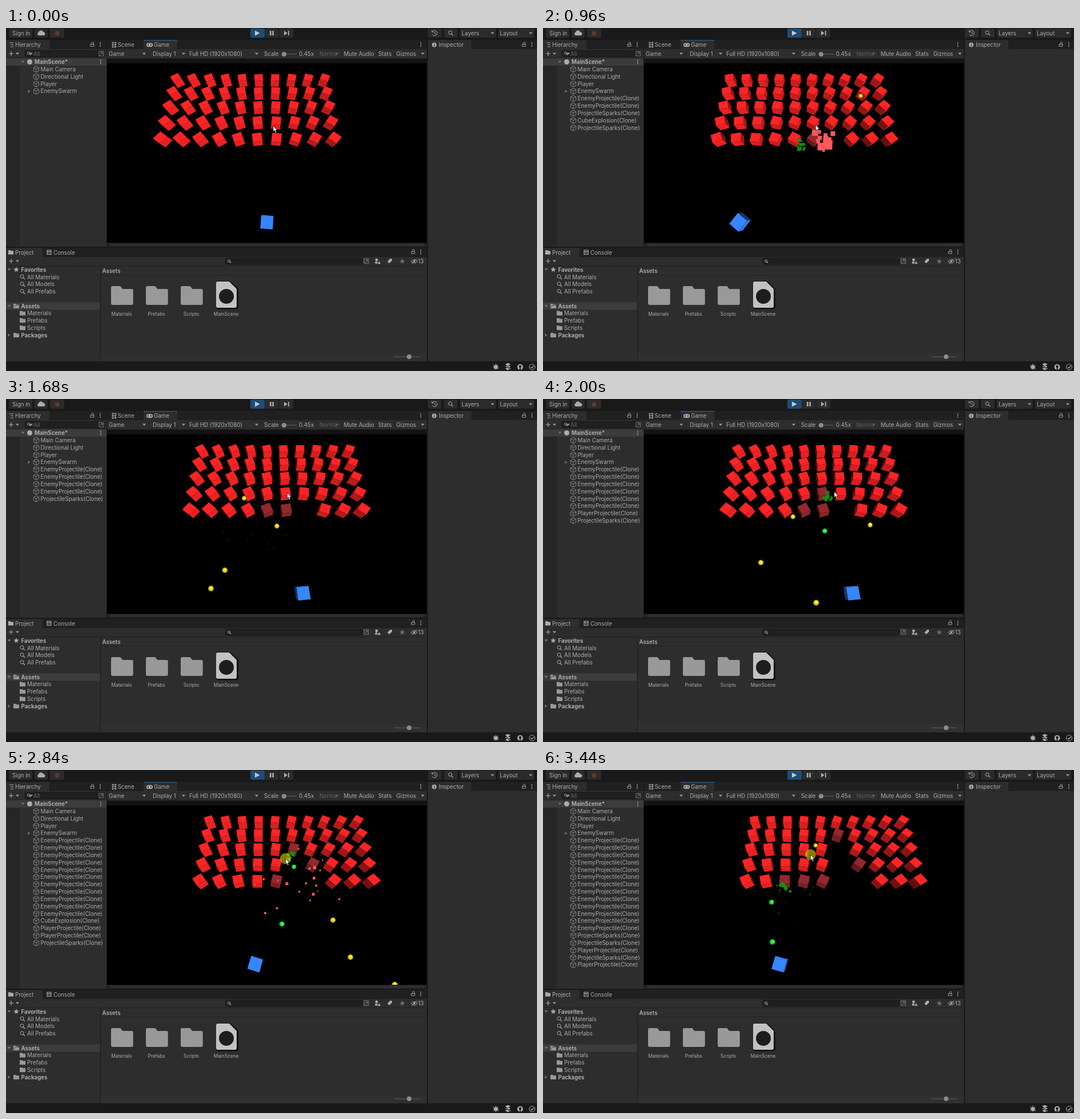
Animation, 930 px wide and 602 px high, one loop 3.48 s. Source, as an HTML page with a canvas:

```html
<!DOCTYPE html>
<html lang="en">
<head>
<meta charset="utf-8">
<title>Cube swarm in the editor</title>
<style>
html, body { margin: 0; width: 100%; height: 100%; overflow: hidden; background: #191919; }
svg, canvas { position: absolute; left: 0; top: 0; display: block; }
canvas { left: 177px; top: 62px; }
text { font-family: Inter, Roboto, sans-serif; white-space: pre; }
</style>
</head>
<body>
<svg id="ui" width="930" height="602" viewBox="0 0 930 602"></svg>
<canvas id="game" width="560" height="315"></canvas>
<script>
// ---------- editor window ----------
const INK = '#acacac', PANEL = '#2d2d2d', BAR = '#202020', EDGE = '#191919';
const rect = (x, y, w, h, fill, more = '') => `<rect x="${x}" y="${y}" width="${w}" height="${h}" fill="${fill}" ${more}/>`;
const text = (x, y, s, size = 9.8, more = '') => `<text x="${x}" y="${y + 3.5}" font-size="${size}" fill="${INK}" ${more}>${s}</text>`;
const bold = (x, y, s) => text(x, y, s, 9.7, 'font-weight="700"');
const fill = (d, c = INK) => `<path d="${d}" fill="${c}"/>`;
const line = (d, c = INK, w = 1) => `<path d="${d}" fill="none" stroke="${c}" stroke-width="${w}"/>`;
const disc = (x, y, r, c = INK) => `<circle cx="${x}" cy="${y}" r="${r}" fill="${c}"/>`;
const ring = (x, y, r) => `<circle cx="${x}" cy="${y}" r="${r}" fill="none" stroke="${INK}"/>`;
const down = (x, y) => fill(`M${x - 3.2} ${y - 1.5}h6.4l-3.2 3.5z`, '#999');
const right = (x, y) => fill(`M${x - 2} ${y - 3}v6l4 -3z`, '#707070');
const open = (x, y) => fill(`M${x - 3} ${y - 2}h6l-3 4z`, '#707070');
const dots = (x, y) => [-3, 0, 3].map(d => disc(x, y + d, 0.9)).join('');
const lock = (x, y) => line(`M${x - 3} ${y - .5}h6v3.500h-6zM${x - 1} ${y - 1}v-1.500a1.700 1.700 0 0 1 3.400 0v2`, INK, .9);
const lens = (x, y, r = 3) => ring(x, y, r) + line(`M${x + r * .7} ${y + r * .7}l${r} ${r}`, INK, 1.3);
const plus = (x, y) => line(`M${x - 4} ${y}h8M${x} ${y - 4}v8`, INK, 1.2) + down(x + 11, y);
const folder = (x, y, w, h, c = '#999') => {
  const r = w / 16;
  return fill(`M${x} ${y + r}q0 ${-r} ${r} ${-r}h${w * .36}l${w * .1} ${h * .15}h${w * .42}q${r} 0 ${r} ${r}V${y + h - r}q0 ${r} ${-r} ${r}H${x + r}q${-r} 0 ${-r} ${-r}z`, c);
};
const cubeIcon = (x, y) => line(`M${x} ${y - 5.3}l4.7 2.4v5.7l-4.7 2.5l-4.7 -2.5v-5.7zM${x - 4.7} ${y - 2.9}l4.7 2.5l4.7 -2.5M${x} ${y - .4}v5.5`, '#8f8f8f', .9);
const popup = (x, y) => line(`M${x - 4} ${y - 4}h8v8h-8zM${x - 2} ${y + 2}l4 -4h-3m3 0v3`, '#888', .9);
const star = (x, y, r, c = INK) => fill('M' + [...Array(10).keys()].map(i => {
  const a = i * Math.PI / 5, q = i % 2 ? r * .45 : r;
  return `${(x + q * Math.sin(a)).toFixed(1)} ${(y - q * Math.cos(a)).toFixed(1)}`;
}).join('L') + 'z', c);
const button = (x, w, c = '#2b2b2b') => rect(x, 1, w, 16, c, 'rx="2"');
const ROW = 12.83, rowY = i => 72.5 + i * ROW;
const item = (i, s) => cubeIcon(53, rowY(i)) + text(60.5, rowY(i), s);

const toolbar = () => button(5, 41) + text(11, 9, 'Sign in') + button(50, 23) + button(77, 25) +
  fill('M57 13a3 3 0 0 1 0 -5.5a4.3 4.3 0 0 1 8 -.8a3.3 3.3 0 0 1 1.5 6.3z') + disc(89.5, 9.5, 4, '#5e3a2c') +
  button(428, 25, '#1f4c75') + button(453.5, 24) + button(478.5, 25) +
  fill('M436 4.5v9l8.5 -4.5z', '#c8c8c8') + rect(462, 5, 2.6, 8, INK) + rect(466.4, 5, 2.6, 8, INK) +
  fill('M487 5v8l6 -4z') + rect(494, 5, 1.8, 8, INK) +
  button(739, 24) + line('M747 6.2a4.5 4.5 0 1 1 -.3 5M746 4v3h3M751 6.5v3l2 1') +
  button(767, 24) + lens(778, 8) + button(795, 63) + text(798, 9, 'Layers') + down(852, 9) +
  button(862, 63) + text(865, 9, 'Layout') + down(919, 9);

const hierarchy = () => rect(0, 21, 176, 363, PANEL) + rect(0, 21, 176, 16, BAR) + rect(0, 21, 76, 17, PANEL) +
  rect(0, 53, 24, 331, '#262626') + rect(0, 52, 176, 1, '#222') + rect(0, 53, 176, 13, '#3c3c3c') +
  line('M6 26h7M8 29.5h5M8 33h5') + text(16, 29, 'Hierarchy') + lock(151, 29) + dots(165, 29) +
  plus(9, 45) + rect(33, 39.5, 140, 11, BAR, 'rx="3" stroke="#181818"') + lens(39.5, 44, 2) + down(44, 45) +
  text(48, 45, 'All', 9.7, 'opacity=".5"') + popup(167, 45) +
  open(29.5, 59.5) + disc(41.5, 59.5, 4.5) + bold(50, 59.5, 'MainScene*') + dots(166, 59.5) +
  ['Main Camera', 'Directional Light', 'Player', 'EnemySwarm'].map((s, i) => item(i, s)).join('') + right(40.5, rowY(3));

const gamePanel = () => rect(177, 21, 560, 363, PANEL) + rect(177, 21, 560, 16, BAR) +
  rect(241, 21, 59, 17, PANEL) + rect(241, 21, 59, 1.2, '#2c5d8f') +
  line('M185 26h9M185 29.5h9M185 33h9M187 24v11M191.5 24v11') + text(195.5, 29, 'Scene') +
  rect(246, 26.5, 11, 6.5, INK, 'rx="3"') + disc(249, 29.7, 1.2, PANEL) + disc(254, 29.7, 1.2, PANEL) + text(259, 29, 'Game') + dots(726.5, 29) +
  rect(177, 53, 560, 9, '#131313') + rect(177, 53, 560, 1, '#222') + rect(177, 62, 560, 315, '#000') +
  rect(177, 377, 560, 7, '#222') + rect(182, 378.5, 551, 4, '#303030', 'rx="2"') +
  [249.5, 317, 445, 587, 648.5, 680].map(x => rect(x, 39, 1, 13, '#222')).join('') +
  text(180, 45, 'Game') + down(242, 45) + text(257, 45, 'Display 1') + down(311, 45) +
  text(321, 45, 'Full HD (1920x1080)') + down(439, 45) + text(452, 45.5, 'Scale') +
  rect(482, 45, 27, 1.5, '#555') + disc(487, 46, 4, '#8c8c8c') + text(513, 45.5, '0.45x') +
  text(549, 45, 'Norma', 9.7, 'opacity=".4"') + `<g opacity=".4">${down(580, 45)}</g>` +
  text(591.5, 45, 'Mute Audio') + text(652, 45, 'Stats') + text(683.5, 45, 'Gizmos') + down(730, 45);

const inspector = () => rect(739, 21, 191, 564, PANEL) + rect(739, 21, 191, 16, BAR) + rect(739, 21, 76, 17, PANEL) +
  disc(750, 29.5, 4) + rect(749.4, 28.7, 1.3, 3.5, PANEL) + rect(749.4, 26.7, 1.3, 1.2, PANEL) +
  text(758, 29, 'Inspector') + lock(907, 29) + dots(921, 29);

const project = () => rect(0, 386, 737, 199, PANEL) + rect(0, 386, 737, 16, BAR) + rect(0, 386, 64, 17, PANEL) +
  folder(4, 390, 9, 7.5, INK) + text(16, 394, 'Project') +
  line('M72 390h7v7.5h-7zM72 392.3h7M73.5 395h4', INK, 1.2) + text(83, 394, 'Console') + lock(713, 393) + dots(726.5, 393) +
  plus(9, 409) + rect(384.5, 404, 240, 11, BAR, 'rx="3" stroke="#181818"') + lens(390.5, 409, 2) + popup(631, 409) +
  disc(649, 407, 2.4) + rect(646.5, 410, 4, 3.5, INK) + fill('M651 414l2.5 -5l2.5 5z') +
  fill('M668 410l4.5 -5h3.5v3.5l-5 4.5z') + star(694, 409.5, 5, '#6c6c6c') +
  line('M709.5 409.5q5.5 -6 11 0q-5.5 6 -11 0M710.5 414l9 -9') + disc(715, 409.5, 1.8) + text(721.5, 409.5, '13') +
  rect(0, 417, 737, 1, '#222') + rect(165, 418, 1, 167, '#1e1e1e') + rect(166, 433, 571, 1, '#252525') + text(168.5, 426, 'Assets', 9.7, 'font-weight="600"') +
  rect(0, 481.5, 164.5, 13, '#3c3c3c') +
  open(5.5, 424) + star(18, 424, 5) + bold(26.5, 424, 'Favorites') +
  ['All Materials', 'All Models', 'All Prefabs'].map((s, i) => lens(28, 436 + i * ROW, 3) + text(37, 437 + i * ROW, s)).join('') +
  open(5.5, 488) + folder(13, 484, 10, 8) + line('M14 490.5l2 -4h8', '#3c3c3c', .8) + bold(26.5, 488, 'Assets') +
  ['Materials', 'Prefabs', 'Scripts'].map((s, i) => folder(24, 496.5 + i * ROW, 10, 8) + text(37, 500.5 + i * ROW, s) +
    folder(184 + i * 61, 453, 38.5, 33) + text(202.5 + i * 61, 501, s, 8.3, 'text-anchor="middle"')).join('') +
  right(5.5, 539) + folder(13, 535, 10, 8) + bold(26.5, 539, 'Packages') +
  fill('M371 444.5h22l14 13v32q0 4 -4 4h-31q-4 0 -4 -4v-41q0 -4 3 -4z', '#111') +
  fill('M371 445h20l13 13v30q0 3 -3 3h-30q-3 0 -3 -3v-40q0 -3 3 -3z', '#c2c2c2') + disc(386, 471, 13, '#1d1d1d') +
  text(385.5, 501, 'MainScene', 8.3, 'text-anchor="middle"') +
  rect(166, 571, 571, 14, '#303030') + rect(680, 576.5, 45, 1.3, '#555') + disc(706, 577, 4, '#8c8c8c');

const status = () => disc(858, 595, 3.5) + line('M853 591l10 8M853 595h10M854 599l8 -8M858 589v11') +
  [590, 594, 598].map(y => fill(`M874 ${y}l5 -2l5 2l-5 2.5z`)).join('') + line('M874 590l10 10', EDGE, 1.4) + line('M875 590l9 9') +
  disc(900.5, 595, 5) + disc(900.5, 594, 2.2, EDGE) + rect(899.5, 596, 2, 4, EDGE) +
  ring(921.5, 595, 5) + line('M919 595l2 2l3.5 -4', INK, 1.2);

document.getElementById('ui').innerHTML = rect(0, 0, 930, 602, EDGE) + toolbar() + hierarchy() + gamePanel() +
  inspector() + project() + status() + '<g id="clones"></g>';

// ---------- 3D view: camera 15 units up, pitched 70 degrees, 60 degree lens ----------
const g = document.getElementById('game').getContext('2d');
const LOOP = 3480, CX = 457, CY = 219.5, F = 272.8, H = 15;
const SIN = Math.sin(70 * Math.PI / 180), COS = Math.cos(70 * Math.PI / 180);
const LIGHT = [.321, .766, -.557];

function toScreen(x, y, z) {
  const s = F / ((H - y) * SIN + z * COS);
  return [CX + x * s, CY - ((y - H) * COS + z * SIN) * s, s];
}
function toGround(sx, sy) {
  const u = (CY - sy) / F, z = H * (COS + u * SIN) / (SIN - u * COS);
  return [(sx - CX) / F * (H * SIN + z * COS), z];
}
function track(keys, t) {
  let i = 1;
  while (i < keys.length - 1 && keys[i][0] < t) i++;
  const a = keys[i - 1], b = keys[i], k = Math.min(1, Math.max(0, (t - a[0]) / (b[0] - a[0])));
  return a.slice(1).map((v, j) => v + (b[j + 1] - v) * k);
}
const noise = n => { const v = Math.sin(n * 127.1 + 11.7) * 43758.5453; return v - Math.floor(v); };

// A cube on the ground, turned to face (tx, tz)
function cube(x, z, tx, tz, color, size = 1) {
  const len = Math.hypot(tx - x, tz - z) || 1, fx = (tx - x) / len, fz = (tz - z) / len, h = size / 2;
  const axes = [[fz, 0, -fx], [0, 1, 0], [fx, 0, fz]];
  for (let a = 0; a < 3; a++) for (const side of [-1, 1]) {
    const n = axes[a].map(v => v * side), u = axes[(a + 1) % 3], v = axes[(a + 2) % 3];
    const c = [x + n[0] * h, n[1] * h, z + n[2] * h];
    if (n[0] * c[0] + n[1] * (c[1] - H) + n[2] * c[2] >= 0) continue;
    const lit = Math.max(0, n[0] * LIGHT[0] + n[1] * LIGHT[1] + n[2] * LIGHT[2]);
    const k = Math.min(1, (.126 + 1.14 * lit) ** .4545);
    g.fillStyle = `rgb(${color.map(q => Math.round(q * k))})`;
    g.beginPath();
    for (const [p, q] of [[-h, -h], [h, -h], [h, h], [-h, h]]) {
      const s = toScreen(...c.map((w, i) => w + u[i] * p + v[i] * q));
      g.lineTo(s[0], s[1]);
    }
    g.fill();
  }
}
function ball(x, z, light, mid, dark) {
  const [sx, sy, s] = toScreen(x, 0, z), r = s * .26;
  const shade = g.createRadialGradient(sx + r * .2, sy - r * .25, 0, sx, sy, r);
  [light, mid, dark].forEach((c, i) => shade.addColorStop([0, .55, 1][i], c));
  g.fillStyle = shade;
  g.beginPath();
  g.arc(sx, sy, r, 0, 7);
  g.fill();
}
function burst(age, x, z, seed, o) {
  if (age < 0 || age >= o.life) return;
  const [sx, sy] = toScreen(x, 0, z), sec = age / 1000;
  g.fillStyle = o.color;
  for (let i = 0; i < o.count; i++) {
    const n = seed * 50 + i * 3, a = noise(n) * 6.283, d = o.speed * (.1 + .9 * noise(n + 1)) * sec;
    const w = Math.max(1, o.size * (.35 + .65 * noise(n + 2)) * (1 - age / o.life));
    g.fillRect(sx + Math.cos(a) * d - w / 2, sy + Math.sin(a) * d + o.fall * sec * sec - w / 2, w, w);
  }
}
const DEBRIS = { life: 480, count: 20, speed: 270, size: 16, fall: 360, color: '#ff5a5a' };
const SPARKS = { life: 330, count: 12, speed: 230, size: 7, fall: 220, color: '#009a08' };

// ---------- the battle ----------
// Turning points: time, then position (ground x for the player, pixels for the mouse)
const PLAYER = [[120, 0], [480, -6], [960, -5.6], [1130, -10], [1400, -4.1], [1730, 4.4], [1865, 1], [2000, 4.2],
  [2240, 10], [2400, 10], [2840, -1], [3210, -10], [3440, -2.1]];
const MOUSE = [[0, 468, 172], [400, 515, 172], [600, 515, 172], [700, 478, 171], [1400, 476, 168], [1740, 496, 164],
  [2000, 510, 162.5], [2360, 514.5, 162], [2840, 489.5, 155.5], [3440, 468.5, 148.5]];
const CLICKS = [400, 630, 700, 1146, 1730, 1868, 2120, 2249, 2500, 2615, 2760, 3000, 3150, 3275, 3395];
// Enemy fire: time, row, column
const VOLLEYS = [[940, 1, 8], [955, 4, 9], [1375, 0, 4], [1600, 4, 5], [1870, 3, 3], [1907, 4, 8], [2120, 3, 8],
  [2160, 3, 8], [2350, 4, 7], [2500, 4, 7], [2560, 3, 7], [2970, 4, 2], [3370, 1, 4]];

const playerX = t => track(PLAYER, t)[0];
const aimAt = t => toGround(...track(MOUSE, t));
const enemyX = (col, t) => -11 + 2 * col + Math.floor((t + 500) / 720);
const enemyZ = row => 15 - 2 * row;

function shoot(t, x, z, tx, tz, speed) {
  const k = speed / 1000 / Math.hypot(tx - x, tz - z);
  return { t, end: LOOP, at: now => [x + (tx - x) * k * (now - t), z + (tz - z) * k * (now - t)] };
}
const shots = CLICKS.map(t => shoot(t, playerX(t), -1, ...aimAt(t), 44));
const enemyShots = VOLLEYS.map(([t, row, col]) => shoot(t, enemyX(col, t), enemyZ(row), playerX(t), -1, 22));
const swarm = Array.from({ length: 50 }, (_, i) => ({ col: i % 10, z: enemyZ(Math.floor(i / 10)), hits: [] }));
const bursts = [];

// The first hit darkens a cube, the second destroys it
for (let t = 0; t < LOOP; t += 4) for (const s of shots) {
  if (t < s.t || t >= s.end) continue;
  const [x, z] = s.at(t);
  const e = swarm.find(e => e.hits.length < 2 && Math.hypot(enemyX(e.col, t) - x, e.z - z) < .75);
  if (!e) continue;
  e.hits.push(t);
  s.end = t;
  bursts.push(e.hits.length > 1 ? { t, x: enemyX(e.col, t), z: e.z, kind: DEBRIS } : { t, x, z, kind: SPARKS });
}

const clones = document.getElementById('clones');
let shown = '';
function showClones(t) {
  const alive = (list, name) => list.filter(o => t >= o.t && t < o.end).map(o => ({ t: o.t, name }));
  const rest = alive(shots, 'PlayerProjectile');
  for (const b of bursts) if (t >= b.t && t < b.t + 480) {
    rest.push({ t: b.t, name: b.kind === DEBRIS ? 'CubeExplosion' : 'ProjectileSparks' });
  }
  rest.sort((a, b) => a.t - b.t);
  const html = [...alive(enemyShots, 'EnemyProjectile'), ...rest].map((o, i) => item(4 + i, o.name + '(Clone)')).join('');
  if (html !== shown) clones.innerHTML = shown = html;
}

function cursor(x, y) {
  g.fillStyle = '#fff';
  g.strokeStyle = '#000';
  g.lineWidth = .7;
  const arrow = new Path2D(`M${x} ${y}v10l2.3 -2l1.7 4l1.8 -.8l-1.7 -3.8l3.1 -.2z`);
  g.fill(arrow);
  g.stroke(arrow);
}

function draw(t) {
  g.setTransform(1, 0, 0, 1, -177, -62);
  g.fillStyle = '#000';
  g.fillRect(177, 62, 560, 315);
  const px = playerX(t), [mx, my] = track(MOUSE, t), items = [];
  for (const { col, z, hits } of swarm) {
    if (t >= hits[1]) continue;
    const color = t >= hits[0] ? [148, 40, 44] : [255, 36, 37];
    items.push([z, () => cube(enemyX(col, t), z, px, -1, color)]);
  }
  items.push([-1, () => cube(px, -1, ...aimAt(t), [54, 134, 255], 1.05)]);
  const addBalls = (list, ...colors) => list.forEach(s => {
    const [x, z] = s.at(t);
    if (t >= s.t && t < s.end && z > -3) items.push([z + .25, () => ball(x, z, ...colors)]);
  });
  addBalls(enemyShots, '#fffb50', '#f0dc1c', '#7d6f00');
  addBalls(shots, '#50ff70', '#22ee44', '#088a20');
  items.sort((a, b) => b[0] - a[0]).forEach(i => i[1]());
  bursts.forEach((b, i) => burst(t - b.t, b.x, b.z, i + 1, b.kind));

  if (CLICKS.some(c => t >= c && t - c < 100)) {
    g.fillStyle = 'rgba(225,215,0,.58)';
    g.beginPath();
    g.arc(mx, my, 9.5, 0, 7);
    g.fill();
  }
  cursor(mx, my);
}

function frame() {
  const t = performance.now() % LOOP, step = t < 80 ? 0 : t - t % 40;
  showClones(step);
  draw(step);
  requestAnimationFrame(frame);
}
frame();
</script>
</body>
</html>
```
